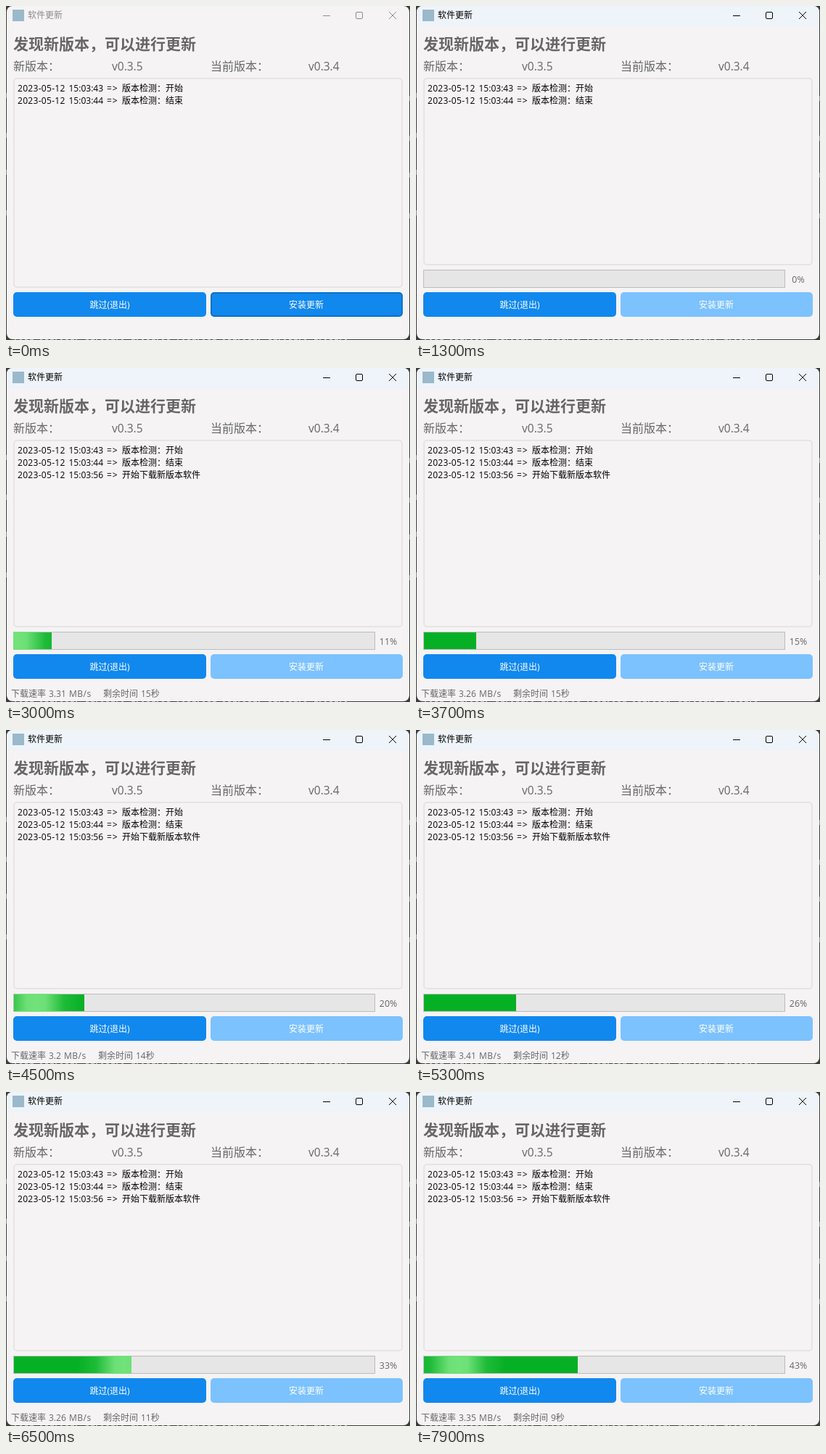
An HTML page with a canvas for the animation above (8 s loop, 557 by 461 pixels).

```html
<!DOCTYPE html>
<html lang="zh-CN">
<head>
<meta charset="utf-8">
<title>软件更新</title>
<style>
html, body { margin: 0; width: 100%; height: 100%; overflow: hidden; background: #3c3c3c; }
canvas { display: block; width: 557px; height: 461px; }
</style>
</head>
<body>
<canvas id="stage" width="557" height="461"></canvas>
<script>
const ctx = document.getElementById('stage').getContext('2d');
const LOOP = 8000, STEP = 100;
const FONT = '"Open Sans", "Noto Sans CJK SC", "Noto Sans CJK", sans-serif';
const GREY = '#666';

const ACTIVE = 700, PRESS = 1000, SHOW_BAR = 1200, START = 1500;

// time, percent
const PROGRESS = [[1500, 0.6], [2300, 6.6], [2500, 7.2], [3000, 11], [4500, 20],
  [5300, 26], [6500, 33], [7100, 37.6], [7900, 43]];

// time, MB/s, seconds left
const STATUS = [[1500, '3.18', 17], [1900, '3.27', 16], [2400, '3.29', 16], [2900, '3.31', 15],
  [3400, '3.26', 15], [3900, '3.22', 14], [4400, '3.2', 14], [4900, '3.36', 13],
  [5300, '3.41', 12], [5800, '3.33', 12], [6300, '3.26', 11], [6800, '3.31', 10],
  [7300, '3.33', 10], [7800, '3.35', 9]];

const GLOW_STARTS = [1430, 2580, 3940, 5300, 7250];
const GLOW_SPEED = 0.19, GLOW_R = 65;

const latest = (list, t, key = v => v) => list.filter(v => key(v) <= t).pop();

function percentAt(t) {
  if (t < START) return 0;
  const i = PROGRESS.findIndex(p => p[0] >= t);
  if (i < 0) return 43;
  if (i === 0) return Math.round(PROGRESS[0][1]);
  const [t0, a] = PROGRESS[i - 1], [t1, b] = PROGRESS[i];
  return Math.round(a + (b - a) * (t - t0) / (t1 - t0));
}

function text(s, x, cy, size, color, { weight = 400, align = 'left', spacing = 0 } = {}) {
  ctx.font = `${weight} ${size}px ${FONT}`;
  ctx.fillStyle = color;
  ctx.textAlign = align;
  ctx.letterSpacing = spacing + 'px';
  ctx.fillText(s, x, Math.round(cy + size * 0.37));
}

function rect(x, y, w, h, color) {
  ctx.fillStyle = color;
  ctx.fillRect(x, y, w, h);
}

function round(x, y, w, h, r, color) {
  ctx.fillStyle = color;
  ctx.beginPath();
  ctx.roundRect(x, y, w, h, r);
  ctx.fill();
}

function line(color, ...pts) {
  ctx.strokeStyle = color;
  ctx.lineWidth = 1;
  ctx.beginPath();
  for (let i = 0; i < pts.length; i += 4) {
    ctx.moveTo(pts[i], pts[i + 1]);
    ctx.lineTo(pts[i + 2], pts[i + 3]);
  }
  ctx.stroke();
}

function drawWindow(active) {
  rect(0, 0, 557, 461, '#3c3c3c');
  for (const y of [120, 175, 226, 282]) {
    rect(0, y, 1, 7, '#8c8c8c');
    rect(556, y + 4, 1, 7, '#8c8c8c');
  }
  // text peeking out below the window
  for (let i = 0; i < 66; i++) {
    if (i % 9 !== 4) rect(12 + i * 7, 460, 2 + i * 5 % 4, 1, '#a8a8a8');
  }
  round(1, 0, 555, 460, 8, '#f5f3f4');
  if (active) round(1, 0, 555, 28, [8, 8, 0, 0], '#eef4f9');

  const ink = active ? '#000' : '#8c8c8c';
  rect(9, 5, 16, 16, '#9ab9cb');
  text('软件更新', 30, 13, 12, ink);
  line(ink, 437, 13.5, 447, 13.5);
  ctx.beginPath();
  ctx.roundRect(482.5, 8.5, 9, 9, 1.5);
  ctx.stroke();
  line(ink, 528, 8, 538, 18, 538, 8, 528, 18);
}

function drawHeader() {
  text('发现新版本，可以进行更新', 10, 52, 21, GREY, { weight: 700 });
  text('新版本：', 10, 83, 16, GREY);
  text('v0.3.5', 146, 83, 15.5, GREY);
  text('当前版本：', 282, 83, 16, GREY);
  text('v0.3.4', 417, 83, 15.5, GREY);
}

function logLine(time, message, cy) {
  text('2023-05-12', 16, cy, 12, '#000', { spacing: 0.3 });
  text(time, 86.5, cy, 12, '#000');
  text('=>', 139, cy, 12, '#000', { spacing: 1 });
  text(message, 160, cy, 12, '#000');
}

function drawLog(t) {
  const bottom = t < SHOW_BAR ? 389 : 358;
  ctx.strokeStyle = '#e6e4e4';
  ctx.lineWidth = 2;
  ctx.beginPath();
  ctx.roundRect(11, 100, 535, bottom - 101, 4);
  ctx.stroke();
  logLine('15:03:43', '版本检测：开始', 114);
  logLine('15:03:44', '版本检测：结束', 131);
  if (t >= START) logLine('15:03:56', '开始下载新版本软件', 148);
}

function drawBar(t) {
  const pct = percentAt(t);
  rect(10, 364, 499, 25, '#bcbcbc');
  rect(11, 365, 497, 23, '#e6e6e6');
  if (pct > 0) {
    const w = Math.floor(9 + 4.98 * pct) - 11;
    rect(11, 365, w, 23, '#06b025');
    const c = (t - latest(GLOW_STARTS, t)) * GLOW_SPEED - GLOW_R;
    const g = ctx.createLinearGradient(c - GLOW_R, 0, c + GLOW_R, 0);
    [[0, 0], [0.2, 0.22], [0.4, 0.95], [0.5, 1], [0.6, 0.95], [0.8, 0.22], [1, 0]]
      .forEach(([p, a]) => g.addColorStop(p, `rgba(114,226,122,${a})`));
    // the glow also tints the frame
    rect(10, 364, w + 1, 25, g);
  }
  text(pct + '%', 527, 377, 12.4, GREY, { align: 'center' });
}

function drawButtons(t) {
  const center = { align: 'center' };
  round(10, 395, 266, 34, 5, '#1088ee');
  text('跳过(退出)', 143, 413, 12, '#fff', center);
  if (t < SHOW_BAR) {
    round(282, 395, 265, 34, 5, '#0c70c6');
    round(284, 397, 261, 30, 3, t < PRESS ? '#1088ee' : '#0d7ad8');
  } else {
    round(282, 395, 265, 34, 5, '#7cc2ff');
  }
  text('安装更新', 414, 413, 12, '#fff', center);
}

function drawStatus(t) {
  const [, rate, left] = latest(STATUS, t, v => v[0]);
  const x = 59 + 7 * rate.length;
  text('下载速率', 7, 450, 12, GREY);
  text(rate, 59, 450, 12, GREY);
  text('MB/s', x, 450, 12, GREY, { spacing: 0.5 });
  text('剩余时间', x + 47, 450, 12, GREY);
  text(left + '秒', x + 99, 450, 12, GREY);
}

function frame(now) {
  const t = Math.floor(now % LOOP / STEP) * STEP;
  drawWindow(t >= ACTIVE);
  drawHeader();
  drawLog(t);
  if (t >= SHOW_BAR) drawBar(t);
  drawButtons(t);
  if (t >= START) drawStatus(t);
}

let origin;
function tick(now) {
  origin ??= now;
  frame(Math.max(0, now - origin));
  requestAnimationFrame(tick);
}
frame(0);
requestAnimationFrame(tick);
</script>
</body>
</html>
```
